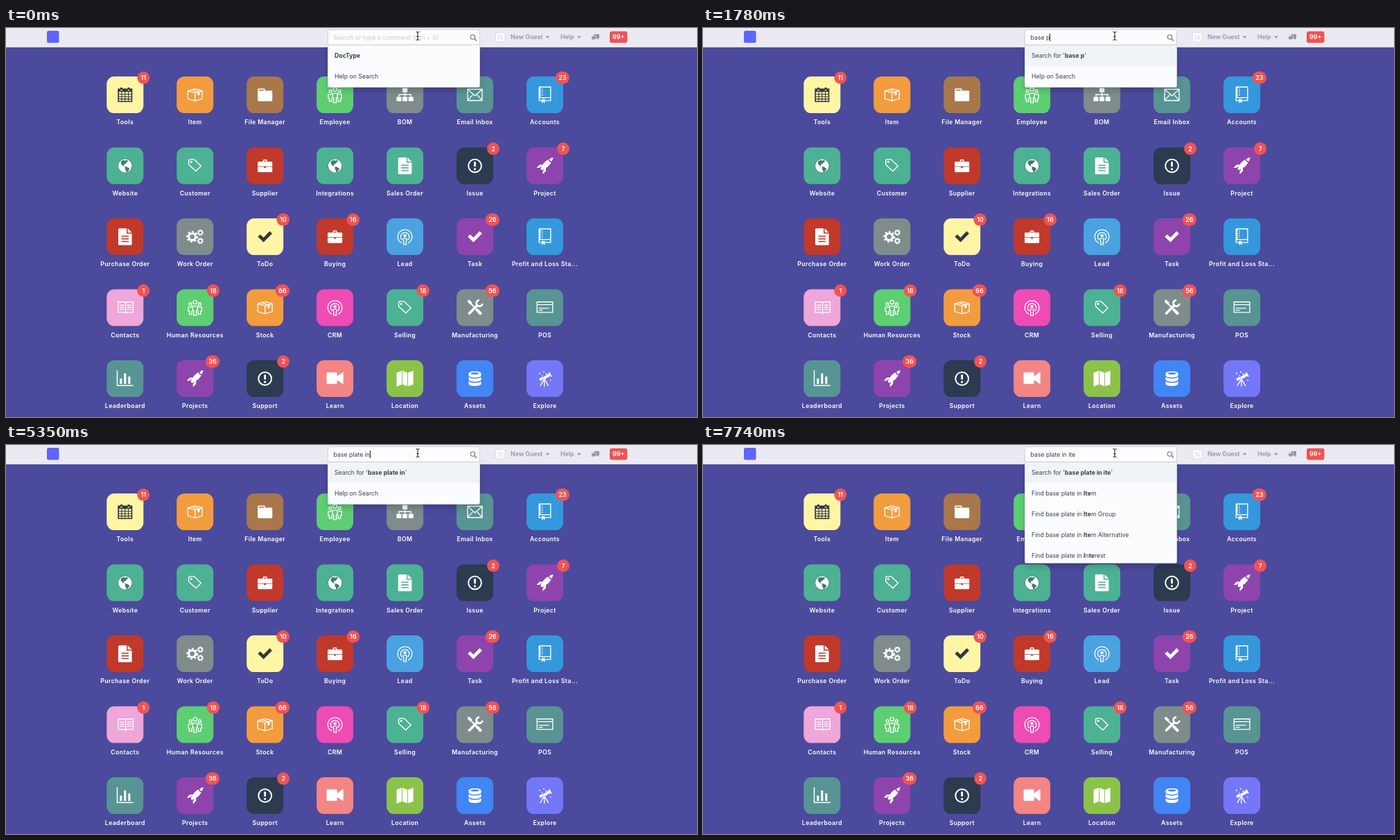
Write an HTML page that moves like this. It is 997 by 562 pixels and loops after 8000 ms.

```html
<!DOCTYPE html>
<html lang="en">
<head>
<meta charset="utf-8">
<title>Desk search</title>
<style>
  html, body { margin: 0; width: 100%; height: 100%; overflow: hidden; background: #4b4a9c; }
  body { position: relative; font: 8.72px/30px Inter, "Open Sans", sans-serif; color: #36414c; }
  svg { position: absolute; left: 0; top: 0; }
  text { font-weight: 600; fill: #fff; }
  .label { text-anchor: middle; letter-spacing: .36px; }
  .badge { text-anchor: middle; font-size: 9px; }
  .nav { font-size: 8.8px; fill: #8d99a6; }
  .initial { text-anchor: middle; font-size: 9.5px; font-weight: 400; fill: #d3d8dd; }
  #field, #list { position: absolute; left: 464px; width: 220px; box-sizing: border-box; white-space: pre; }
  #field { top: 2px; height: 23px; padding-left: 7.6px; line-height: 22px; background: #fcfcfd;
    border: 1px solid #cfd3da; border-radius: 3px; }
  #typed { position: relative; display: inline-block; height: 21px; vertical-align: top; }
  #typed.empty { color: #c9cbd1; }
  #typed.caret::after { content: ""; position: absolute; right: -1px; top: 5px; width: 1px; height: 11px; background: #222; }
  #list { top: 25px; max-height: 145.5px; overflow: hidden; background: #fbfcfd; border: 1px solid #d1d8dd; border-top: 0;
    border-radius: 0 0 3px 3px; box-shadow: 0 4.5px 9px rgba(0, 0, 0, .18); }
  #list div { height: 30px; padding-left: 9px; }
  #list.hit div:first-child { background: #f0f4f7; }
  #list b { font-weight: 700; }
</style>
</head>
<body>
<svg id="desk" width="997" height="562" viewBox="0 0 997 562"></svg>
<div id="field"><span id="typed"></span></div>
<div id="list"></div>
<svg id="front" width="997" height="28" viewBox="0 0 997 28"></svg>
<script>
const $ = id => document.getElementById(id);
const fill = d => `<path d="${d}" fill="currentColor" fill-rule="evenodd"/>`;
const line = (d, w = .9) => `<path d="${d}" fill="none" stroke="currentColor" stroke-width="${w}"/>`;
const dot = (x, y, r) => `<circle cx="${x}" cy="${y}" r="${r}" fill="currentColor"/>`;
const ring = (x, y, r, w = .9, extra = "") =>
  `<circle cx="${x}" cy="${y}" r="${r}" fill="none" stroke="currentColor" stroke-width="${w}" ${extra}/>`;
const gear = (x, y, r) => ring(x, y, r * .58, r * .36) +
  ring(x, y, r * .86, r * .28, 'pathLength="16" stroke-dasharray="1 1"');

// Each icon sits on a grid 16 units high: [width, markup].
const icons = {
  calendar: [14, line("M.6 2.6h12.8v11.8H.6z", 1.1) + fill("M2.5 1h2v3h-2zM9.5 1h2v3h-2zM.5 2.5h13v2.7H.5z") +
    line("M1 7.4h12M1 9.7h12M1 12h12M3.8 5v9M7 5v9M10.2 5v9", .7)],
  box: [15, line("M.6 4.2L7.5 2.2l6.9 2v7.6l-6.9 2-6.9-2zM.6 4.2l6.9 2 6.9-2M7.5 6.2v7.6M4 3.2l6.8 2") +
    fill("M10 5.6l2-.5v3l-2 .5z")],
  folder: [14, fill("M13 4H7V3c0-.66-.31-1-1-1H1c-.55 0-1 .45-1 1v10c0 .55.45 1 1 1h12c.55 0 1-.45 1-1V5c0-.55-.45-1-1-1zM6 4H1V3h5v1z")],
  people: [14, ring(7, 2.7, 1.8) + ring(2.6, 4.6, 1.3) + ring(11.4, 4.6, 1.3) +
    line("M4.7 6.5h4.6v4.3h-1v4.7H5.7v-4.7h-1zM4 7.5H.6v3.8h1v3h2.3v-3M10 7.5h3.4v3.8h-1v3h-2.3v-3")],
  tree: [16, fill("M5.6 1.5h4.8v4H5.6zM0 10h4.6v4H0zM5.7 10h4.6v4H5.7zM11.4 10H16v4h-4.6z") +
    line("M8 5v5M2.3 10V7.8h11.4V10")],
  mail: [15, line("M.6 2.6h13.8v10.8H.6zM.8 3l6.7 5.8L14.2 3M.8 13l4.6-5M14.2 13L9.6 8")],
  repo: [12, line("M.5.5h11v13H6M3 13.5H.5V.5M.5 10.7h11") + line("M1.3 1v9.5", 1.1) +
    line("M3.5 2v1M3.5 4v1M3.5 6v1M3.5 8v1") + fill("M3 12h3v4l-1.5-1.5L3 16z")],
  globe: [14, '<circle cx="7" cy="8" r="6.9" fill="#2c3b50" opacity=".45"/>' +
    fill("M7 1.6a6.4 6.4 0 1 0 .01 0zM3.3 3.4l2.8-1 1 .7 1.6-.6 1.4 1.2-1.6.9-.7 1.4-1.5.4-.8 1.2 1 1.2 2.2.2 2.6 1.5-.7 1.8-1.5 1.5-.8.4-.5-1.8-1-1.6.4-1.5-2.3-1.2L3 6z")],
  tag: [15, line("M1.5 3.4Q1.5 1.9 3 1.9h2.8q.8 0 1.5.6l5.9 5.7-4.9 4.9-6.2-5.7q-.6-.6-.6-1.4z") + fill("M3 3.4h1.8v1.8H3z")],
  brief: [14, fill("M9 4V3c0-.55-.45-1-1-1H6c-.55 0-1 .45-1 1v1H1c-.55 0-1 .45-1 1v8c0 .55.45 1 1 1h12c.55 0 1-.45 1-1V5c0-.55-.45-1-1-1H9zM6 3h2v1H6V3zM0 9h6v1h2V9h6v-.5H0z")],
  file: [13, fill("M1 0h7v5h5v10q0 1-1 1H1q-1 0-1-1V1q0-1 1-1zM9 0l4 4H9zM3 7h7v1H3zM3 9.5h7v1H3zM3 12h7v1H3z")],
  alert: [14, ring(7, 8, 6.2, 1.3) + line("M7 4.2v4.6M7 10.2v1.8", 1.8)],
  rocket: [16, fill("M12.2 3.8q-.8-.8-1-1.9-1.8 1-3.4 2.6Q6.7 5.6 6 7H3l-3 3h3l2-2q-.8 1.8-1 3l1 1q1.2-.2 3-1l-2 2v3l3-3v-3q1.4-.7 2.5-1.8 1.5-1.6 2.6-3.4-1.1-.2-1.9-1zM16 0q-.4 1.9-1.4 3.7Q12.5 3.4 12.3 1.4 14 .4 16 0z")],
  gears: [16.5, gear(5.5, 8, 5.6) + gear(13.3, 4, 3.1) + gear(13.3, 12, 3.1)],
  check: [12, fill("M12.8 5l-8.2 8.2L-.8 8l2.3-2.3 3.1 3L10.5 2.7z")],
  cast: [16, line("M5 14.1A6.8 6.8 0 1 1 11 14.1M5.2 11A4.1 4.1 0 1 1 10.8 11") + dot(8, 7, 1.5) +
    line("M6.2 10.4q0-.9 1-.9h1.6q1 0 1 .9l-.6 2.2v2.9H6.8v-2.9z")],
  book: [16, line("M1.5 2.5h6l1 1 1-1h6v10h-6l-1 1-1-1h-6zM8.5 3.5v9M3 5.5h4M3 7.5h4M3 9.5h4M10 5.5h4M10 7.5h4M10 9.5h4")],
  tools: [16, line("M3.8 3.6L13.6 14", 1.3) + line("M9.5 9.5l4.5 4.7", 2.8) +
    line("M2 14l8.8-8.8", 2.4) + fill("M1 1.2L2.5.4l3 2.7-2 1.9L1 2.5z") +
    line("M12.3.8a2.9 2.9 0 1 0 2.9 3.2", 1.9)],
  card: [16, line("M.5 2.5h15v10H.5zM1 5h14M2 8.5h10M2 10.5h4")],
  chart: [16, fill("M16 14v1H0V0h1v14h15zM5 13H3V8h2v5zm4 0H7V3h2v10zm4 0h-2V6h2v7z")],
  video: [16, fill("M1 2h8q1 0 1 1v2.7L15.2 2q.8-.3.8.5v10q0 .8-.8.4L10 9.3V12q0 1-1 1H1q-1 0-1-1V3q0-1 1-1z")],
  map: [16, fill("M0 2.3L5 .5v13L0 15.5zM5.7.5l4.6 1.8v13l-4.6-1.8zM11 2.3L16 .5v13l-5 1.8z")],
  disks: [12, fill("M0 3q.5-2 6-2t6 2v2q-.5 2-6 2T0 5zM2 3q.5 1 4 1t4-1q-.5-1-4-1T2 3z") +
    [6.5, 10.5].map(y => fill(`M.2 ${y}q1.5 1.5 5.8 1.5t5.8-1.5l.2.5v2q-.8 2-6 2t-6-2v-2z`)).join("")],
  scope: [16, line("M3 9.2l3.5-2M7 7.6l6-3.5", 2.5) + line("M12 2l2.2 4", 1.2) +
    line("M7.5 8.5v7M7 9l-3.4 6M8 9l3.4 6") + dot(3, 3, .7) + dot(7, 1.5, .7) + dot(13.5, 9.5, .6) +
    line("M8.5 3.5h2M5 5h1")]
};

const colors = {
  yellow: "#fff5a5", orange: "#f29c3e", brown: "#a8784b", green: "#5dce72", grey: "#7f8c8b", sea: "#589494",
  blue: "#3598dc", teal: "#4db193", red: "#c0392b", navy: "#2c3b50", purple: "#8e44ad", sky: "#4aa2e0",
  pink: "#efa6d8", rose: "#ef4bb5", salmon: "#f38585", lime: "#8bc34a", azure: "#4285f4", violet: "#7477f7"
};
const tiles = `Tools yellow calendar 11|Item orange box|File Manager brown folder|Employee green people|BOM grey tree|Email Inbox sea mail|Accounts blue repo 23
Website teal globe|Customer teal tag|Supplier red brief|Integrations teal globe|Sales Order teal file|Issue navy alert 2|Project purple rocket 7
Purchase Order red file|Work Order grey gears|ToDo yellow check 10|Buying red brief 16|Lead sky cast|Task purple check 26|Profit and Loss Sta... blue repo
Contacts pink book 1|Human Resources green people 18|Stock orange box 66|CRM rose cast|Selling teal tag 18|Manufacturing grey tools 56|POS sea card
Leaderboard sea chart|Projects purple rocket 36|Support navy alert 2|Learn salmon video|Location lime map|Assets azure disks|Explore violet scope`;

const ruler = document.createElement("canvas").getContext("2d");
ruler.font = "600 9px Inter, sans-serif";

// Badges grow leftwards from a fixed right edge.
function badge(count) {
  const w = Math.max(18, ruler.measureText(count).width + 9);
  const x = 35.5 - w;
  return `<rect x="${x}" y="-33.8" width="${w}" height="18" rx="9" fill="#f05354"/>
    <text class="badge" x="${x + w / 2}" y="-21.5">${count}</text>`;
}

function tile(spec, col, row) {
  const [, name, color, icon, count] = spec.match(/^(.+) ([a-z]+) ([a-z]+)(?: (\d+))?$/);
  const [w, art] = icons[icon];
  return `<g transform="translate(${171.8 + 100.95 * col} ${96.6 + 102.5 * row})">
    <rect x="-26.5" y="-26.5" width="53" height="53" rx="11" fill="${colors[color]}"/>
    <g transform="scale(1.51) translate(${-w / 2} -8)" color="${color === "yellow" ? "#2f3840" : "#fff"}">${art}</g>
    <text class="label" y="42.9">${name}</text>${count ? badge(count) : ""}</g>`;
}

const arrow = x => `<path d="M${x - 3} 11.8h6l-3 3.2z" fill="#8d99a6"/>`;
$("desk").innerHTML =
  tiles.split("\n").map((r, j) => r.split("|").map((s, i) => tile(s, i, j)).join("")).join("") +
  `<rect width="997" height="28" fill="#ebeaf2"/><rect y="27" width="997" height="1" fill="#dddde8"/>
  <rect x="59" y="4" width="17.5" height="17.5" rx="2.5" fill="#5e64ff"/>
  <rect x="706.5" y="6.5" width="13.5" height="13.5" rx="2" fill="#fafbfc" stroke="#d9dde2"/>
  <text class="initial" x="713.3" y="16.8">N</text>
  <text class="nav" x="728" y="16.3">New Guest</text>${arrow(781.5)}
  <text class="nav" x="800" y="16.3">Help</text>${arrow(827)}
  <path d="M848.5 9h7.5v6h-1.2v2.3L852.5 15h-4z" fill="#8d99a6"/>
  <path d="M844.8 11.5h6.7v4.8h-3.3l-1.9 2v-2h-1.5z" fill="#8d99a6" stroke="#ebeaf2" stroke-width=".6"/>
  <rect x="871" y="4.7" width="25.5" height="16.8" rx="3" fill="#f05354"/>
  <text class="badge" x="883.8" y="16.3">99+</text>`;

const beam = "M591.5 5.5q2.5 0 2.5 1.5 0-1.5 2.5-1.5M594 7v9M591.5 17.5q2.5 0 2.5-1.5 0 1.5 2.5 1.5M592.5 12.5h3";
$("front").innerHTML = `<g color="#6c7680">${ring(673.5, 13, 3.2, 1.1)}${line("M675.9 15.4l3.2 3.2", 1.4)}</g>
  <g color="#fff">${line(beam, 2.2)}</g><g color="#111">${line(beam, 1)}</g>`;

const help = "Help on Search";
const query = (q, ...more) => [`Search for '*${q}*'`, ...more];
const report = n => `Report Payment Period *${"Based".slice(0, n)}*${"Based".slice(n)} On Invoice Date`;
const finds = ["*Ite*m", "*Ite*m Group", "*Ite*m Alternative", "*I*n*te*rest"].map(s => "Find base plate in " + s);
const rowsFor = q => {
  if (!q) return ["*DocType*", help];
  if (q.endsWith("ite")) return query(q, ...finds, help);
  return "base".startsWith(q) ? query(q, report(q.length), help) : query(q, help);
};

// time, typed text, listed query, caret shown
const steps = [
  [0, "", "", 0], [150, "b", "", 1], [300, "ba", "", 1], [440, "bas", "ba", 1], [590, "bas", "bas", 1],
  [740, "base", "base", 1], [1040, "base ", "base", 1], [1480, "base ", "base", 0], [1630, "base p", "base", 1],
  [1780, "base p", "base p", 1], [2080, "base p", "base p", 0], [2380, "base p;", "base p", 1],
  [2530, "base p;a", "base p;a", 1], [2820, "base p;", "base p;a", 0], [2970, "base p", "base p;", 1],
  [3120, "base pl", "base p", 1], [3270, "base pla", "base pl", 1], [3420, "base plate", "base pla", 1],
  [3560, "base plate ", "base pla", 1], [3710, "base plate ", "base plat", 1], [3860, "base plate ", "base plate", 1],
  [4010, "base plate ", "base plate", 0], [4160, "base plate o", "base plate o", 1],
  [4600, "base plate ", "base plate", 1], [5050, "base plate ", "base plate", 0],
  [5200, "base plate i", "base plate", 1], [5350, "base plate in", "base plate in", 1],
  [5790, "base plate in", "base plate in", 0], [5940, "base plate in ", "base plate in", 1],
  [6390, "base plate in ", "base plate in", 0], [6990, "base plate in i", "base plate in", 1],
  [7290, "base plate in ite", "base plate in", 1], [7440, "base plate in ite", "base plate in ite", 1],
  [7740, "base plate in ite", "base plate in ite", 0]
];

let shown;
function draw(now) {
  const t = Math.max(0, now - start) % 8000;
  const step = steps.findLast(s => s[0] <= t);
  if (step !== shown) {
    shown = step;
    const [, text, listed, caret] = step;
    $("typed").textContent = text || "Search or type a command (Ctrl + G)";
    $("typed").className = (text ? "" : "empty ") + (caret ? "caret" : "");
    $("list").className = listed ? "hit" : "";
    $("list").innerHTML = rowsFor(listed)
      .map(r => `<div>${r.replace(/\*(.+?)\*/g, "<b>$1</b>")}</div>`).join("");
  }
  requestAnimationFrame(draw);
}
const start = performance.now();
draw(start);
</script>
</body>
</html>
```
